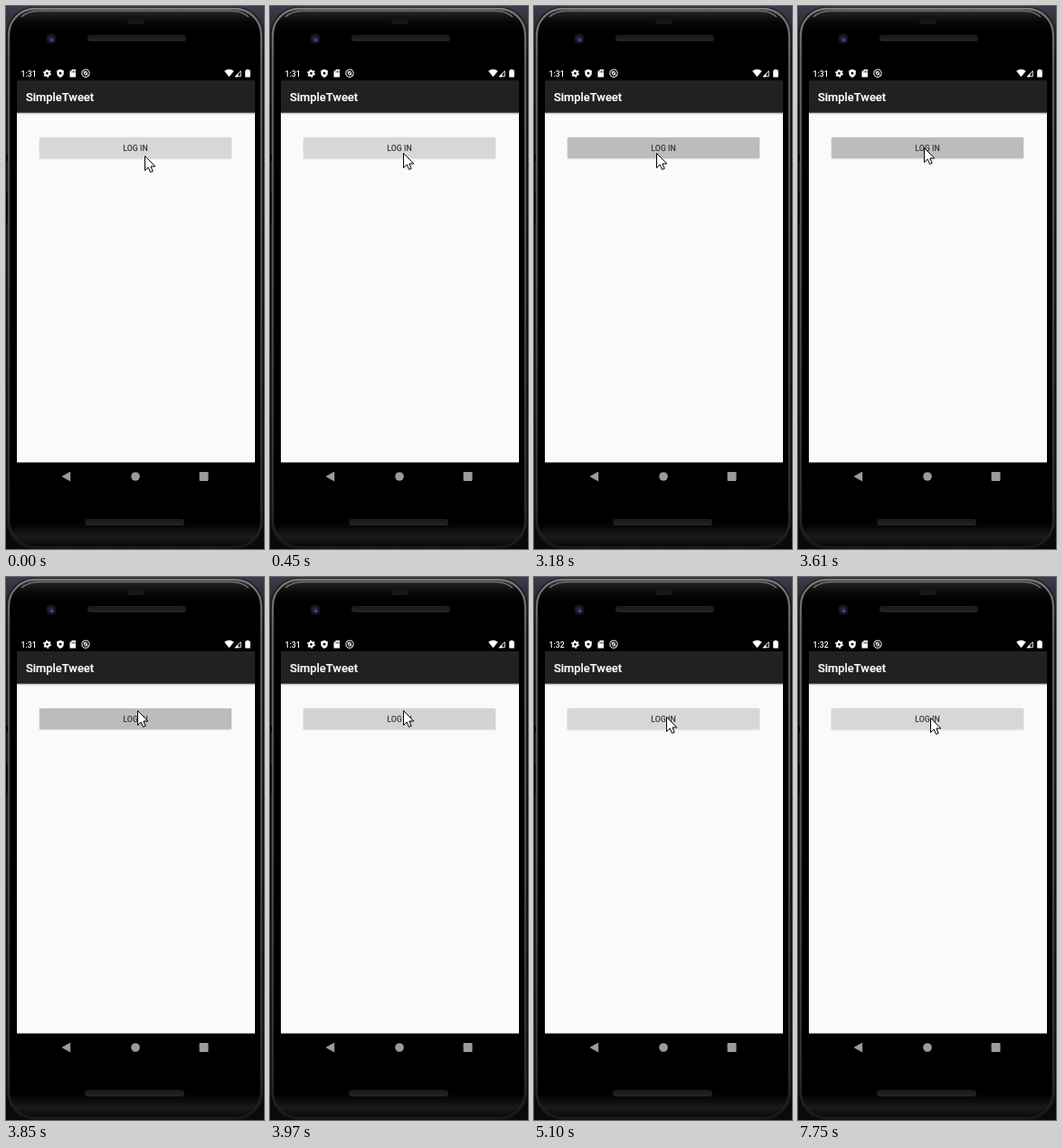
An HTML page for the animation above (8 s loop, 285 by 599 pixels).

```html
<!DOCTYPE html>
<html lang="en">
<head>
<meta charset="utf-8">
<title>Log in</title>
<style>
html, body { margin: 0; width: 100%; height: 100%; overflow: hidden; background: #000; }
svg { display: block; width: 285px; height: 599px; }
text { font-family: Roboto, "Noto Sans", sans-serif; font-weight: 500; }
#cursor, #button, .clock { animation: 8s step-end infinite; }
#cursor { animation-name: move; }
#button { animation-name: press; }
.clock { animation-name: before; }
.clock.late { animation-name: after; }

@keyframes move {
  0% { transform: translate(153px, 165px); }
  1.875% { transform: translate(150px, 163px); }
  3.75% { transform: translate(148px, 162px); }
  5.625% { transform: translate(147px, 162px); }
  7.5% { transform: translate(145px, 162px); }
  9.375% { transform: translate(135px, 162px); }
  45.125% { transform: translate(139px, 156px); }
  46.625% { transform: translate(143px, 149px); }
  48.125% { transform: translate(145px, 147px); }
  49.625% { transform: translate(147px, 147px); }
  51.125% { transform: translate(148px, 150px); }
  53% { transform: translate(148px, 151px); }
  54.5% { transform: translate(147px, 152px); }
  56% { transform: translate(146px, 153px); }
  63.75% { transform: translate(146px, 154px); }
  96.875%, 100% { transform: translate(146px, 155px); }
}
@keyframes press {
  0% { fill: #d6d7d7; }
  39.75% { fill: #bbbcbc; }
  49.625% { fill: #d1d3d2; }
  51.125%, 100% { fill: #d6d7d7; }
}
@keyframes before {
  0% { opacity: 1; }
  59.875%, 100% { opacity: 0; }
}
@keyframes after {
  0% { opacity: 0; }
  59.875%, 100% { opacity: 1; }
}
</style>
</head>
<body>
<svg viewBox="0 0 285 599">
  <defs>
    <linearGradient id="desk" x2="0" y2="1">
      <stop offset="0" stop-color="#3c3c4c"/>
      <stop offset=".06" stop-color="#222228"/>
      <stop offset=".1" stop-color="#0a0a0a"/>
    </linearGradient>
    <linearGradient id="shell" x2="0" y2="1">
      <stop offset="0" stop-color="#2b2b2d"/>
      <stop offset=".022" stop-color="#0a0a0a"/>
      <stop offset=".04" stop-color="#000"/>
      <stop offset=".955" stop-color="#000"/>
      <stop offset=".98" stop-color="#1a1a1a"/>
      <stop offset="1" stop-color="#080808"/>
    </linearGradient>
    <linearGradient id="rim" x2="0" y2="1">
      <stop offset="0" stop-color="#77787a"/>
      <stop offset=".1" stop-color="#5c5d5e"/>
      <stop offset=".5" stop-color="#4a4a4b"/>
      <stop offset=".92" stop-color="#2c2c2c"/>
      <stop offset="1" stop-color="#1a1a1a"/>
    </linearGradient>
    <linearGradient id="slot" x2="0" y2="1">
      <stop offset="0" stop-color="#141414"/>
      <stop offset="1" stop-color="#262626"/>
    </linearGradient>
    <linearGradient id="shade" x2="0" y2="1">
      <stop offset="0" stop-color="#b9b1b1"/>
      <stop offset="1" stop-color="#fafafa"/>
    </linearGradient>
  </defs>

  <!-- Phone -->
  <rect width="285" height="599" fill="url(#desk)"/>
  <rect x=".5" y="1" width="284" height="598" rx="31" fill="#121212"/>
  <rect x="3" y="3" width="279" height="594" rx="29" fill="url(#shell)" stroke="url(#rim)" stroke-width="2.4"/>
  <path d="M17 12q8-6.5 18-6.5h215q10 0 18 6.5" fill="none" stroke="#707173" stroke-width="1.6"/>
  <path d="M0 164h2v7h-2zM0 206h1.5v33h-1.5z" fill="#000"/>
  <rect x="134" y="14" width="19" height="6" rx="3" fill="#171719"/>
  <rect x="90.5" y="32.5" width="108" height="6" rx="2.5" fill="url(#slot)" stroke="#222"/>
  <rect x="87.5" y="566.5" width="109" height="6" rx="2.5" fill="url(#slot)" stroke="#222"/>
  <circle cx="50" cy="36" r="6" fill="#11121b"/>
  <circle cx="50" cy="36.5" r="3.3" fill="#22264a"/>
  <circle cx="51" cy="37.5" r="1.2" fill="#5460a6"/>

  <!-- Screen -->
  <path d="M12 65h263v470h-263z" fill="#000"/>
  <path d="M12 117h263v386.6h-263z" fill="#fafafa"/>
  <path d="M12 117.5h263v2.7h-263z" fill="url(#shade)"/>
  <path d="M12 82h263v35.8h-263z" fill="#212121"/>
  <text x="22" y="105" font-size="12.9" fill="#fff" stroke="#fff" stroke-width=".2">SimpleTweet</text>

  <!-- Status bar -->
  <g fill="#fff">
    <g font-size="8.8">
      <text class="clock" x="16.5" y="77.5">1:31</text>
      <text class="clock late" x="16.5" y="77.5">1:32</text>
    </g>
    <circle cx="45.5" cy="74.3" r="2.4" fill="none" stroke="#fff" stroke-width="2"/>
    <circle cx="45.5" cy="74.3" r="3.8" fill="none" stroke="#fff" stroke-width="1.2" stroke-dasharray="2 1.98"/>
    <path d="M60 69.7l3.8 1.6v2.8q0 3.5-3.8 4.9q-3.8-1.4-3.8-4.9v-2.8z"/>
    <circle cx="60" cy="74.2" r="1.4" fill="#000"/>
    <path d="M73 70h4v8.5h-6.5v-6z"/>
    <path d="M73 71.5v2M74.5 71.5v2M76 71.5v2" stroke="#000" stroke-width=".7"/>
    <g fill="none" stroke="#fff">
      <circle cx="88" cy="74.2" r="4.1"/>
      <circle cx="88" cy="74.2" r="1.8"/>
      <path d="M85.5 71.7l5 5"/>
      <path d="M253.3 77.7h6v-6z" stroke-width=".9"/>
    </g>
    <path d="M241.2 71.8q5.3-4 10.6 0l-5.3 6.5z"/>
    <path d="M256.5 74.2v4h-4z"/>
    <path d="M265.7 69.8h2.6v1h1.5v7.7h-5.6v-7.7h1.5z"/>
  </g>

  <!-- Button -->
  <rect x="36.3" y="144.4" width="213.4" height="24.8" rx="1.5" fill="#e5e6e5"/>
  <rect id="button" x="37" y="145" width="212" height="23" rx="1"/>
  <text x="143" y="159.6" font-size="8.8" text-anchor="middle" fill="#3a3a3a">LOG IN</text>

  <!-- Navigation -->
  <g fill="#9b9b9b">
    <path d="M61.4 519l9.8-5.4v10.8z"/>
    <circle cx="143" cy="519" r="4.8"/>
    <rect x="213.6" y="514.1" width="9.9" height="9.8" rx=".8"/>
  </g>

  <path id="cursor" d="M.5.5v16l3.7-3.5 2.3 5.4 2.7-1.1-2.3-5.3h4.9z" fill="#fff" stroke="#000"/>
</svg>
</body>
</html>
```
